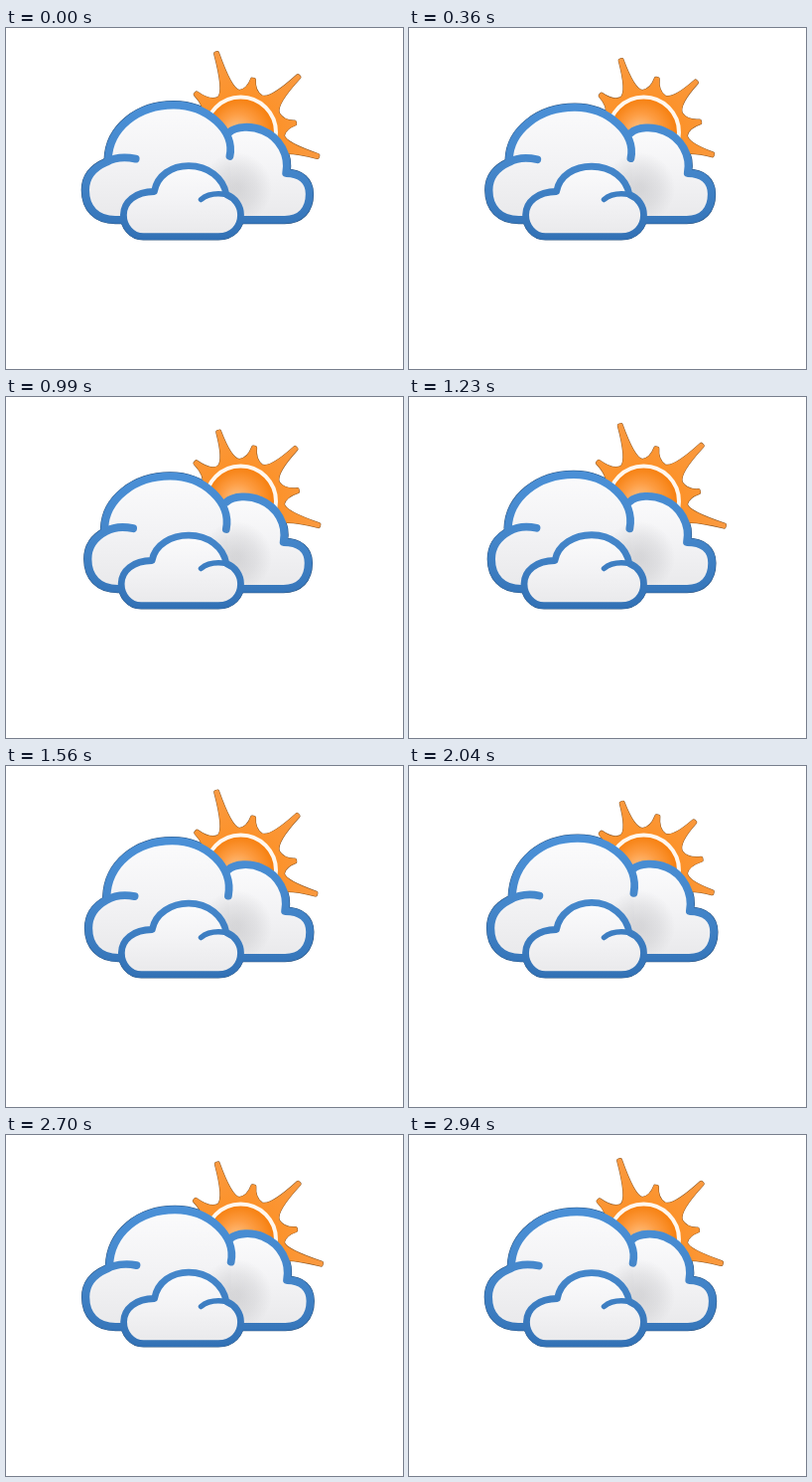
Recreate the animation shown at these times as an HTML page with a canvas. Size 400x343 px, loop 2970 ms.

```html
<!DOCTYPE html>
<html lang="en">
<head>
<meta charset="utf-8">
<title>Sun behind clouds</title>
<style>
html, body { margin: 0; width: 100%; height: 100%; overflow: hidden; background: #fff; }
canvas { display: block; }
</style>
</head>
<body>
<canvas id="stage" width="400" height="343"></canvas>
<script>
const ctx = document.getElementById('stage').getContext('2d');
const LOOP = 2970, TICK = 30, TAU = Math.PI * 2;
const SUN = { x: 237, y: 106, valley: 42 };

const wave = (t, peak, period = LOOP) => Math.cos(TAU * (t - peak) / period);

function gradient(g, ...stops) {
  stops.forEach((c, i) => g.addColorStop(i / (stops.length - 1), c));
  return g;
}
const cloudFill = (top, bottom) =>
  gradient(ctx.createLinearGradient(0, top, 0, bottom), '#fbfbfc', '#f3f3f5', '#e9e9eb');
const blue = gradient(ctx.createLinearGradient(0, 70, 0, 213), '#4b91d8', '#4486ca', '#3271b5');
const orange = gradient(ctx.createRadialGradient(237, 106, 36, 237, 106, 85), '#fc922a', '#f99a42');
const disc = gradient(ctx.createRadialGradient(232, 104, 2, 236, 104, 34), '#ffc184', '#fd9c42', '#f67f0e');
const shade = gradient(ctx.createRadialGradient(232, 161, 4, 232, 161, 36),
  'rgba(90,90,95,.17)', 'rgba(90,90,95,.1)', 'rgba(90,90,95,0)');

// Ray tips; long rays pulse in turn, short ones shrink as their neighbours grow.
function rayTips(t) {
  const half = LOOP / 2;
  const a = wave(t, -20, half), b = wave(t, 1340, half), c = wave(t, 1215, half);
  return [
    [192 - 1.5 * c, 66.5 - c],
    [213.5 - 1.5 * a, 32 - 6.7 * a],
    [249.8 - .8 * a, 51 + .8 * a],
    [291.5 + 4 * b, 52 - 4 * b],
    [293 - 2 * a, 94.5 + a],
    [311.5 + 6.3 * c, 128.5 + 1.2 * c]
  ];
}

function sunPath(tips) {
  const p = new Path2D();
  const polar = (r, angle) => [SUN.x + r * Math.cos(angle), SUN.y + r * Math.sin(angle)];
  const rays = tips.map(([x, y]) => ({
    angle: Math.atan2(y - SUN.y, x - SUN.x),
    r: Math.hypot(x - SUN.x, y - SUN.y)
  }));
  p.moveTo(...polar(SUN.valley, rays[0].angle - .28));
  rays.forEach(({ angle, r }, i) => {
    const next = i < 5 ? (angle + rays[i + 1].angle) / 2 : angle + .28;
    const tip = 1 / r;
    p.quadraticCurveTo(...polar(44, angle - .06), ...polar(r, angle - tip));
    p.lineTo(...polar(r, angle + tip));
    p.quadraticCurveTo(...polar(44, angle + .06), ...polar(SUN.valley, next));
  });
  p.closePath();
  return p;
}

function clouds(t) {
  const sway = 2.7 * wave(t, 2400);
  const bob = 4 * wave(t, 650) - .3;
  const k = bob * .25;
  const l = 81.7 - 1.6 * wave(t, 0);
  const r = 305.8 + 1.4 * wave(t, 2200);
  const f = 117.3 + 1.3 * wave(t, 2700);
  const shape = (outline, closing = '') =>
    ({ line: new Path2D(outline), area: new Path2D(outline + closing) });

  const s = sway * .7;
  const right = shape(`M${224 + s} ${105 + k} C${231 + s} ${98.5 + k} ${247 + s} ${98 + k} ${258 + s} ${103 + k}
    C${275 + s} ${110 + k} ${285 + s} 128 ${281.5 + s} 146 C${r - 9} 146 ${r} 154 ${r} 167
    C${r} 183 ${r - 9} 192.8 ${r - 25} 192.8 L180 192.8`);

  const left = shape(`M${130 + s} ${131.5 + k} C${118 + s} ${129 + k} 108 131 101 135
    C${l + 7} 141 ${l} 150 ${l} 163 C${l} 181 ${l + 11} 192.8 ${l + 30} 192.8 L150 192.8`);

  const top = shape(`M${102 + sway} 132 C${103 + sway} ${100 + bob} ${132 + sway} ${77 + bob} ${168 + sway} ${77 + bob}
    C${202 + sway} ${77 + bob} ${230 + sway} ${103 + bob} ${224.5 + sway} ${130 - 1.1 * sway}`,
    'L228 190 L130 190 Z');

  const front = shape(`M${f + 31} 164.5 C${f + 34} 148 167 ${138.5 + k} 184 ${138.5 + k}
    C204 ${138.5 + k} 219 151 222 167.5 C231 171 236.5 179 236.5 188
    C236.5 200 228 209.7 214 209.7 L${f + 20} 209.7 C${f + 8} 209.7 ${f} 199 ${f} 188
    C${f} 175 ${f + 12} 164.5 ${f + 31} 164.5 Z`);
  const curl = new Path2D('M196.5 172.5 C203 167 213 166 222 167.5');
  return { right, left, top, front, curl };
}

function stroke(path, color, width) {
  ctx.strokeStyle = color;
  ctx.lineWidth = width;
  ctx.stroke(path);
}

function fill(path, color) {
  ctx.fillStyle = color;
  ctx.fill(path);
}

function draw(t) {
  const sun = sunPath(rayTips(t));
  const { right, left, top, front, curl } = clouds(t);
  ctx.fillStyle = '#fff';
  ctx.fillRect(0, 0, 400, 343);
  ctx.lineJoin = ctx.lineCap = 'round';

  // Thin dark rim around the whole silhouette
  stroke(sun, '#8a5726', 4);
  for (const c of [right, left, top]) stroke(c.line, '#25507f', 8.8);
  stroke(front.line, '#25507f', 7.6);

  fill(sun, orange);
  stroke(sun, orange, 3);
  const ring = new Path2D();
  ring.arc(236.5, 105, 35.5, 0, TAU);
  fill(ring, disc);
  stroke(ring, '#fff7ee', 4);

  fill(right.area, cloudFill(100, 192));
  stroke(right.line, blue, 7.8);
  const body = cloudFill(75, 192);
  fill(left.area, body);
  fill(top.area, body);
  stroke(left.line, blue, 7.8);
  stroke(top.line, blue, 7.8);

  ctx.fillStyle = shade;
  ctx.fillRect(196, 125, 72, 64);

  fill(front.area, cloudFill(138, 209));
  stroke(front.line, blue, 6.8);
  stroke(curl, blue, 5.5);
}

function frame(now) {
  draw(Math.floor(now % LOOP / TICK) * TICK);
  requestAnimationFrame(frame);
}
requestAnimationFrame(frame);
</script>
</body>
</html>
```
